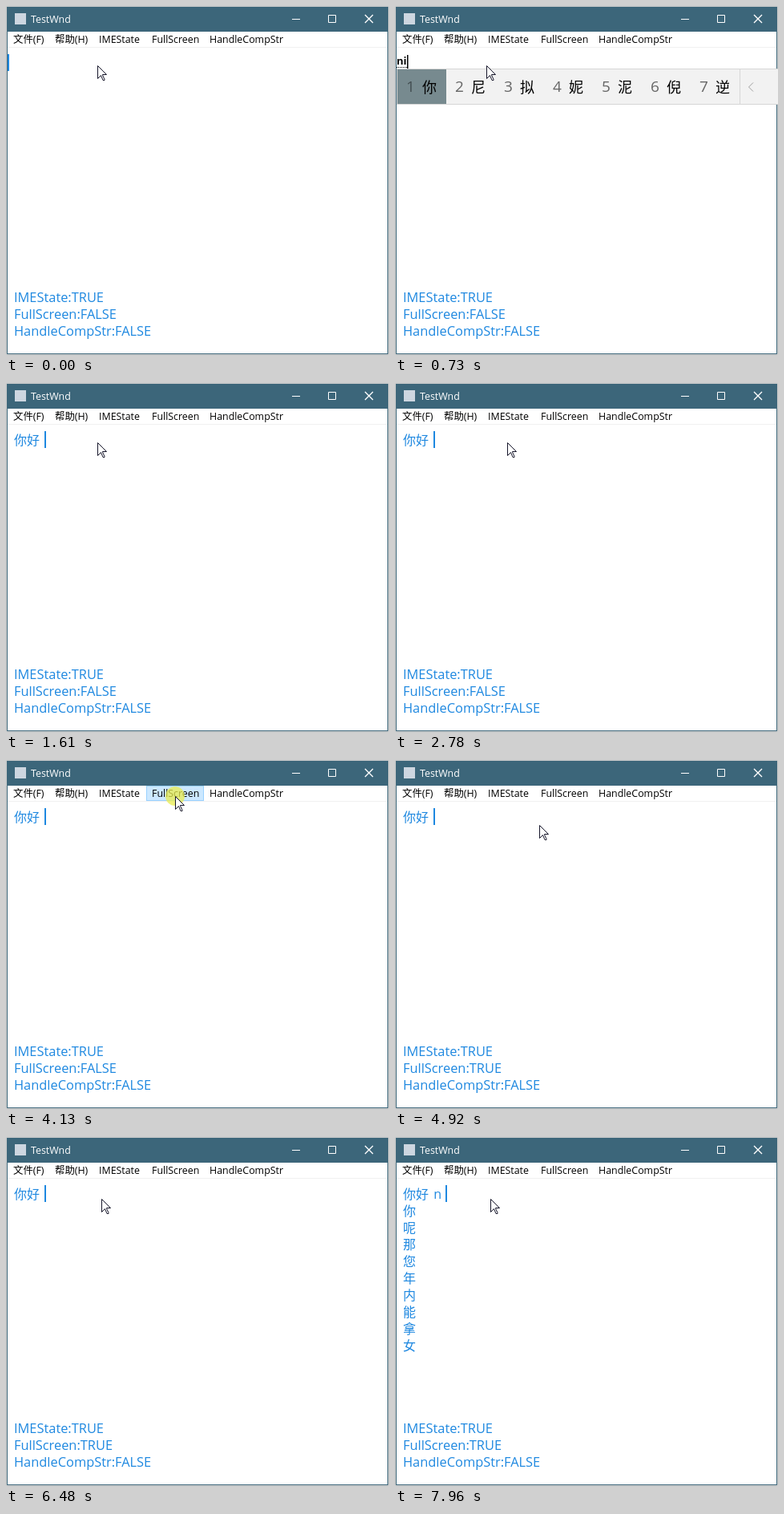
Recreate the animation shown at these times as an HTML page. Size 478 px wide and 435 px high, loop 8 s.

```html
<!DOCTYPE html>
<html lang="zh-CN">
<head>
<meta charset="utf-8">
<title>TestWnd</title>
<style>
  html, body { margin: 0; width: 100%; height: 100%; overflow: hidden; background: #fff; }
  svg { display: block; }
  text { font-family: "Open Sans", "Noto Sans CJK SC", "Noto Sans CJK", sans-serif; white-space: pre; }
  .ui { font-size: 12.4px; fill: #000; }
  .page { font-size: 16.4px; fill: #1e88e0; }
  .entry { font-size: 16px; word-spacing: 2px; }
  .comp { font-size: 13px; font-weight: 700; fill: #000; }
  .num { font-size: 19px; fill: #666; }
  .cand { font-size: 18px; fill: #000; }
</style>
</head>
<body>
<svg id="stage" width="478" height="435" viewBox="0 0 478 435">
  <rect width="478" height="435" fill="#ccc"/>
  <rect x="1.5" y="1.5" width="475" height="432" fill="#fff" stroke="#3c667a"/>
  <rect x="1" y="1" width="476" height="31" fill="#3c667a"/>
  <rect x="11" y="9" width="14" height="14" fill="#cdd6e0"/>
  <text class="ui" x="31" y="21" style="fill:#fff">TestWnd</text>
  <path d="M357 16.5h10M402.5 11.5h9v9h-9z" fill="none" stroke="#fff"/>
  <path d="M448 11l10 10m0-10l-10 10" stroke="#fff" stroke-width="1.4"/>
  <path d="M2 51.5h474" stroke="#f0f0f0"/>
  <g id="menu"></g>
  <g id="page"></g>
  <rect id="caret" y="60" width="2" height="21" fill="#1e88e0"/>
  <g id="comp">
    <text id="typed" class="comp" x="2" y="73"></text>
    <path id="dots" stroke="#000" stroke-dasharray="1 1"/>
    <rect id="bar-caret" y="61" width="1.5" height="17" fill="#000"/>
  </g>
  <g id="bar"></g>
  <circle id="click" r="12" fill="#e9ec50" opacity=".75"/>
  <path id="cursor" d="M.5 .5v16l4-4 2.5 6h2v-1l-2.5-5.5v-.5h5z" fill="#fff" stroke="#16162a"/>
</svg>
<script>
const LOOP = 8000;
const $ = id => document.getElementById(id);

function add(parent, tag, attrs, content = '') {
  const node = document.createElementNS('http://www.w3.org/2000/svg', tag);
  for (const key in attrs) node.setAttribute(key, attrs[key]);
  node.textContent = content;
  parent.append(node);
  return node;
}
const set = (node, attrs) => { for (const key in attrs) node.setAttribute(key, attrs[key]); };
const show = (node, on) => node.setAttribute('visibility', on ? 'visible' : 'hidden');
const latest = (steps, t) => steps.filter(s => s.at <= t).pop();

// Input method: typed letters and the candidates offered for them
const inputs = [
  { at: 0 },
  { at: 500, typed: 'n', words: '你 呢 那 您 年 内 能' },
  { at: 730, typed: 'ni', words: '你 尼 拟 妮 泥 倪 逆' },
  { at: 900, typed: "ni'h", words: '你好 你 尼 拟 妮 泥 倪' },
  { at: 970, typed: "ni'ha", words: '你哈 你 尼 拟 妮 泥 倪' },
  { at: 1120, typed: "ni'hao", words: '你好 拟好 你 尼 拟 妮 泥' },
  { at: 1530, typed: '', words: '你好 拟好 你 尼 拟 妮 泥' },
  { at: 1610 }
];

const pages = [
  { at: 0, lines: '', caret: 2 },
  { at: 1530, lines: '你好', caret: 48 },
  { at: 7960, lines: '你好 n,你,呢,那,您,年,内,能,拿,女', caret: 63 }
];

// Pointer positions: each move steps through its points at a fixed gap
const moves = [
  { at: 0, gap: 80, points: [[114, 74]] },
  { at: 2780, gap: 78.75, points: [[140, 74], [163, 72], [182, 68], [195, 63], [203, 57], [208, 52], [210, 48], [211, 46], [211, 45]] },
  { at: 4760, gap: 80, points: [[205, 55], [193, 70], [180, 81], [166, 78], [154, 66], [147, 53], [143, 44]] },
  { at: 6180, gap: 75, points: [[141, 51], [136, 59], [130, 67], [124, 73], [119, 77]] }
];
const clicks = [[4130, 4210], [5400, 5470], [5860, 5940]];

const items = [['文件(F)', 2, 52], ['帮助(H)', 54, 55], ['IMEState', 109, 66], ['FullScreen', 175, 72], ['HandleCompStr', 247, 106]]
  .map(([label, x, width]) => {
    const box = add($('menu'), 'rect', { x: x + .5, y: 32.5, width: width - 1, height: 18 });
    add($('menu'), 'text', { class: 'ui', x: x + 7, y: 46 }, label);
    return { box, x, width };
  });

const status = [369, 390, 411].map(y => add($('stage'), 'text', { class: 'page', x: 10, y }));
status.forEach(line => $('page').before(line));

function drawPage({ lines, caret }) {
  $('page').replaceChildren();
  lines.split(',').forEach((line, i) =>
    add($('page'), 'text', { class: 'page entry', x: 10, y: 77 + i * 21 }, line));
  set($('caret'), { x: caret });
}

function drawInput({ typed, words }) {
  const bar = $('bar');
  bar.replaceChildren();
  show($('comp'), typed);
  show($('caret'), !typed);
  $('typed').textContent = typed || '';
  if (typed) {
    const end = Math.round(2 + $('typed').getComputedTextLength());
    set($('dots'), { d: `M2 76.5H${end}` });
    set($('bar-caret'), { x: end });
  }
  if (!words) return;
  add(bar, 'rect', { x: 2.5, y: 78.5, width: 500, height: 44, fill: '#f2f2f2', stroke: '#d6d6d6' });
  let x = 3;
  words.split(' ').forEach((word, i) => {
    const width = 43 + word.length * 18;
    if (!i) add(bar, 'rect', { x, y: 79, width, height: 43, fill: '#778a8f' });
    add(bar, 'text', { class: 'num', x: x + 11, y: 107, style: i ? '' : 'fill:#444f52' }, i + 1);
    add(bar, 'text', { class: 'cand', x: x + 31, y: 107.5 }, word);
    x += width;
  });
  add(bar, 'path', { d: `M${x + .5} 79v43`, stroke: '#d6d6d6' });
  add(bar, 'path', { d: `M${x + 17} 95.5l-5.5 5.5 5.5 5.5`, fill: 'none', stroke: '#a0a0a0' });
}

function drawPointer(t) {
  const { at, gap, points } = latest(moves, t);
  const step = Math.min(points.length - 1, Math.floor((t - at) / gap + .01));
  const [x, y] = points[step];
  const pressed = clicks.some(([from, to]) => t >= from && t < to);
  set($('cursor'), { transform: `translate(${x} ${y})` });
  set($('click'), { cx: x, cy: y });
  show($('click'), pressed);
  for (const item of items) {
    const over = y < 51 && x >= item.x && x < item.x + item.width;
    show(item.box, over);
    set(item.box, { fill: pressed ? '#cce8ff' : '#e5f3ff', stroke: pressed ? '#99d1ff' : '#cce8ff' });
  }
}

const flag = on => on ? 'TRUE' : 'FALSE';
let page, input;

function frame(now) {
  const t = now % LOOP;
  const nextPage = latest(pages, t), nextInput = latest(inputs, t);
  if (nextPage !== page) drawPage(page = nextPage);
  if (nextInput !== input) drawInput(input = nextInput);
  status[0].textContent = 'IMEState:' + flag(t < 5470 || t >= 5940);
  status[1].textContent = 'FullScreen:' + flag(t >= 4210);
  status[2].textContent = 'HandleCompStr:FALSE';
  drawPointer(t);
}

const start = performance.now();
function tick() {
  frame(performance.now() - start);
  requestAnimationFrame(tick);
}
tick();
</script>
</body>
</html>
```
